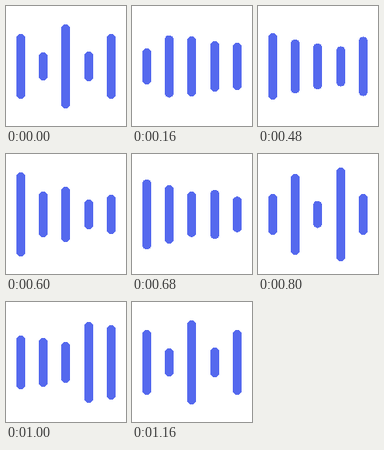
Write an HTML page that moves like this. It is 150 px wide and 150 px high and loops after 1200 ms.

```html
<!DOCTYPE html>
<html lang="en">
<head>
<meta charset="utf-8">
<title>Sound bars</title>
<style>
  html, body { margin: 0; width: 100%; height: 100%; overflow: hidden; background: #fff; }
  svg { display: block; width: 100%; height: 100%; }
  rect { fill: #5569ee; shape-rendering: crispEdges; }
</style>
</head>
<body>
<svg id="stage" viewBox="0 0 150 150"></svg>
<script>
const STEP = 40, LOOP = 1200, PERIOD = 29, WIDTH = 11, MIDDLE = 75.5;

// Each bar: [step, height] pairs, repeating every PERIOD steps
const bars = [
  [[0, 81], [4, 45], [9, 53], [15, 105], [20, 51], [25, 67]],
  [[0, 35], [4, 78], [9, 84], [15, 57], [20, 101], [25, 61]],
  [[0, 105], [4, 75], [9, 46], [15, 69], [20, 34], [25, 51]],
  [[0, 37], [4, 63], [9, 73], [15, 37], [20, 117], [22, 128], [25, 101]],
  [[0, 81], [4, 59], [9, 95], [15, 49], [20, 51], [25, 93]]
];

const stage = document.getElementById("stage");
const rects = bars.map((_, i) => {
  const rect = document.createElementNS("http://www.w3.org/2000/svg", "rect");
  rect.setAttribute("x", 13 + Math.round(28.2 * i));
  rect.setAttribute("width", WIDTH);
  rect.setAttribute("rx", WIDTH / 2);
  return stage.appendChild(rect);
});

// Smooth periodic curve through the keys
function heightAt(keys, s) {
  const n = keys.length;
  const key = i => {
    const [k, h] = keys[(i + n) % n];
    return [k + PERIOD * Math.floor(i / n), h];
  };
  const slope = i => {
    const [a, p] = key(i - 1), [b, q] = key(i + 1);
    return (q - p) / (b - a);
  };
  let i = n - 1;
  while (keys[i][0] > s) i--;
  const [a, p] = key(i), [b, q] = key(i + 1);
  const d = b - a, u = (s - a) / d, v = 1 - u;
  return v * v * (1 + 2 * u) * p + u * u * (3 - 2 * u) * q
    + d * u * v * (v * slope(i) - u * slope(i + 1));
}

function draw(now) {
  const step = Math.floor((now % LOOP) / STEP) % PERIOD;
  rects.forEach((rect, i) => {
    const h = heightAt(bars[i], step);
    rect.setAttribute("y", MIDDLE - h / 2);
    rect.setAttribute("height", h);
  });
}

function tick(now) {
  draw(now);
  requestAnimationFrame(tick);
}
draw(0);
requestAnimationFrame(tick);
</script>
</body>
</html>
```
